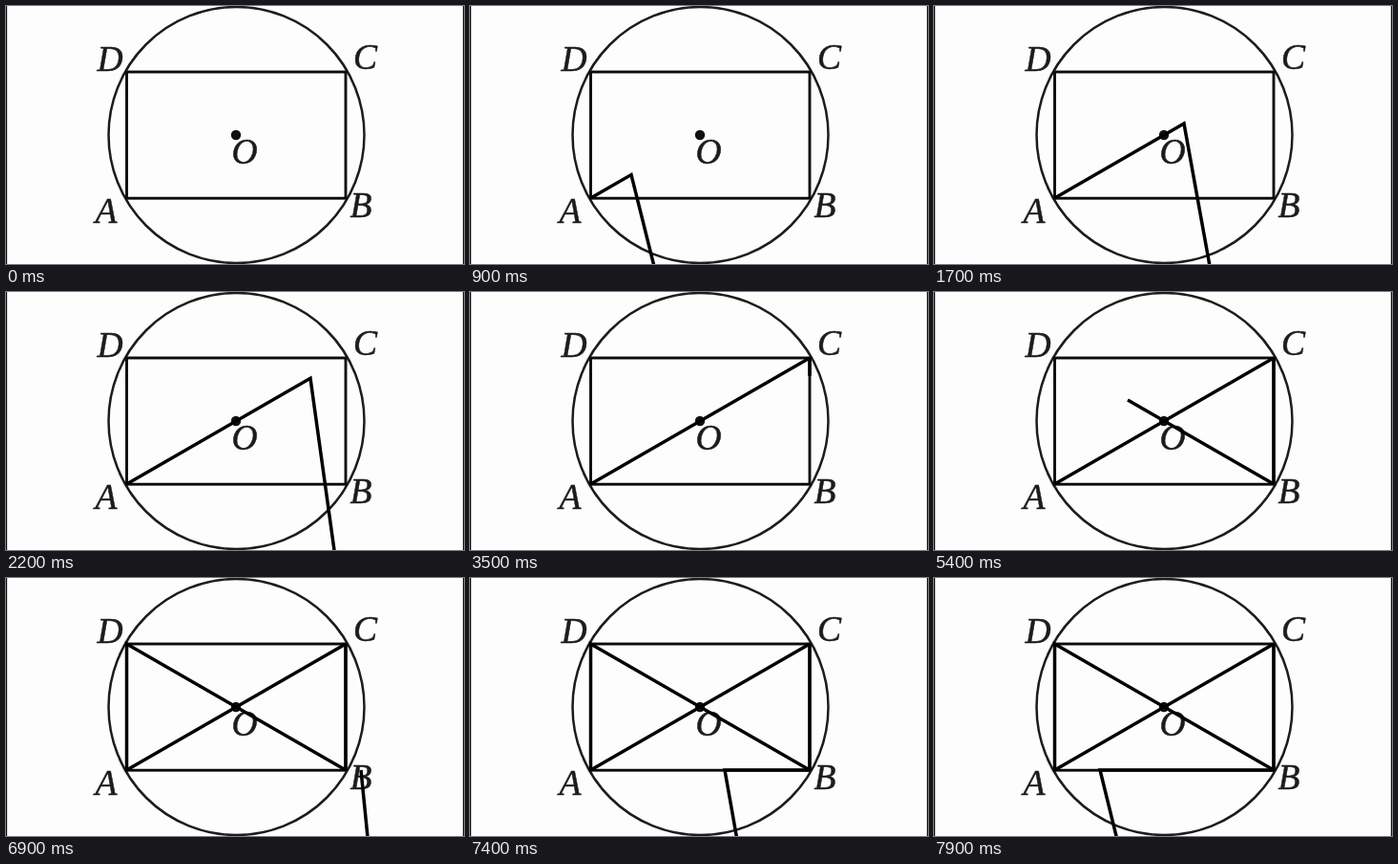
Write an HTML page that moves like this. It is 480 by 270 pixels and loops after 8000 ms.

```html
<!DOCTYPE html>
<html lang="en">
<head>
<meta charset="utf-8">
<title>Rectangle in a circle</title>
<style>
  html, body { margin: 0; width: 100%; height: 100%; overflow: hidden; background: #fdfdfd; }
  svg { display: block; width: 100vw; height: 100vh; }
  text { font: italic 37.5px "Liberation Serif", "Times New Roman", serif; fill: #1c1c1c; stroke: #1c1c1c; stroke-width: .5; }
  .base { fill: none; stroke: #0c0c0c; stroke-width: 2.9; }
  .ink { fill: none; stroke: #000; stroke-width: 3.5; stroke-linejoin: miter; }
</style>
</head>
<body>
<svg viewBox="0 0 480 270">
  <rect width="480" height="270" fill="#fdfdfd"/>
  <path d="M.5 0V270M479.5 0V270" stroke="#111" stroke-width="1.3"/>
  <circle class="base" cx="241.5" cy="135" r="134" style="stroke-width:2.5;stroke:#1c1c1c"/>
  <rect class="base" x="126.5" y="69" width="229.5" height="132.2"/>
  <circle cx="241" cy="135" r="5.2" fill="#111"/>
  <text x="95.5" y="68">D</text>
  <text x="364" y="65.5">C</text>
  <text x="93.5" y="226.5">A</text>
  <text x="360.5" y="220.5">B</text>
  <text x="236.5" y="164.5">O</text>
  <path class="ink" id="ac"/>
  <path class="ink" id="cb"/>
  <path class="ink" id="bda"/>
  <path class="ink" id="ba"/>
</svg>
<script>
const LOOP = 8000, STEP = 100;
const A = [126.5, 201], B = [356, 201], C = [356, 69], D = [126.5, 69];

const mix = (p, q, k) => [p[0] + (q[0] - p[0]) * k, p[1] + (q[1] - p[1]) * k];

// Linear interpolation through [time, value] keys, held at both ends.
function track(keys, t) {
  if (t <= keys[0][0]) return keys[0][1];
  for (let i = 1; i < keys.length; i++) {
    const [t0, v0] = keys[i - 1], [t1, v1] = keys[i];
    if (t <= t1) return v0 + (v1 - v0) * (t - t0) / (t1 - t0);
  }
  return keys[keys.length - 1][1];
}

// The pen leans less the further right its tip is.
function penEnd([x, y]) {
  const lean = 0.25 - 0.00074 * (x - 169);
  return [x + lean * (280 - y), 280];
}

function draw(id, points) {
  const d = points.length > 1 ? "M" + points.map(p => p.join(" ")).join("L") : "";
  document.getElementById(id).setAttribute("d", d);
}

const acX = [[500, 126.5], [900, 169], [1300, 218.5], [1700, 262], [2200, 319], [2300, 332], [2400, 356]];
const daY = [[5900, 69], [6200, 141], [6400, 201]];
const baX = [[6900, 372], [7700, 204], [7900, 174]];

function render(t) {
  // Diagonal A to C, with the pen until it arrives
  const ac = [];
  if (t >= 500) {
    const tip = mix(A, C, (track(acX, t) - A[0]) / (C[0] - A[0]));
    ac.push(A, tip);
    if (t < 2400) ac.push(penEnd(tip));
  }
  draw("ac", ac);

  // Side C to B; the pen rests by B
  const cb = [];
  if (t >= 3500) {
    const tip = mix(C, B, track([[3400, 0], [4100, 1]], t));
    cb.push(C, tip);
    if (t >= 3900 && t < 4500) {
      const rest = [track([[3900, 356], [4100, 359]], t), tip[1]];
      cb.push(rest, penEnd(rest));
    }
  }
  draw("cb", cb);

  // Diagonal B to D, then side D to A
  const bda = [];
  if (t >= 4500) {
    bda.push(B, mix(B, D, track([[4400, 0], [5900, 1]], t)));
    if (t > 5900) bda.push([D[0], track(daY, t)]);
  }
  draw("bda", bda);

  // Side B to A, the pen coming in from the right
  const ba = [];
  if (t >= 6900) {
    const tip = [track(baX, t), 201];
    if (tip[0] < B[0]) ba.push(B);
    ba.push(tip, penEnd(tip));
  }
  draw("ba", ba);
}

const start = performance.now();
function tick() {
  const t = (performance.now() - start) % LOOP;
  render(Math.floor(t / STEP) * STEP);
  requestAnimationFrame(tick);
}
tick();
</script>
</body>
</html>
```
